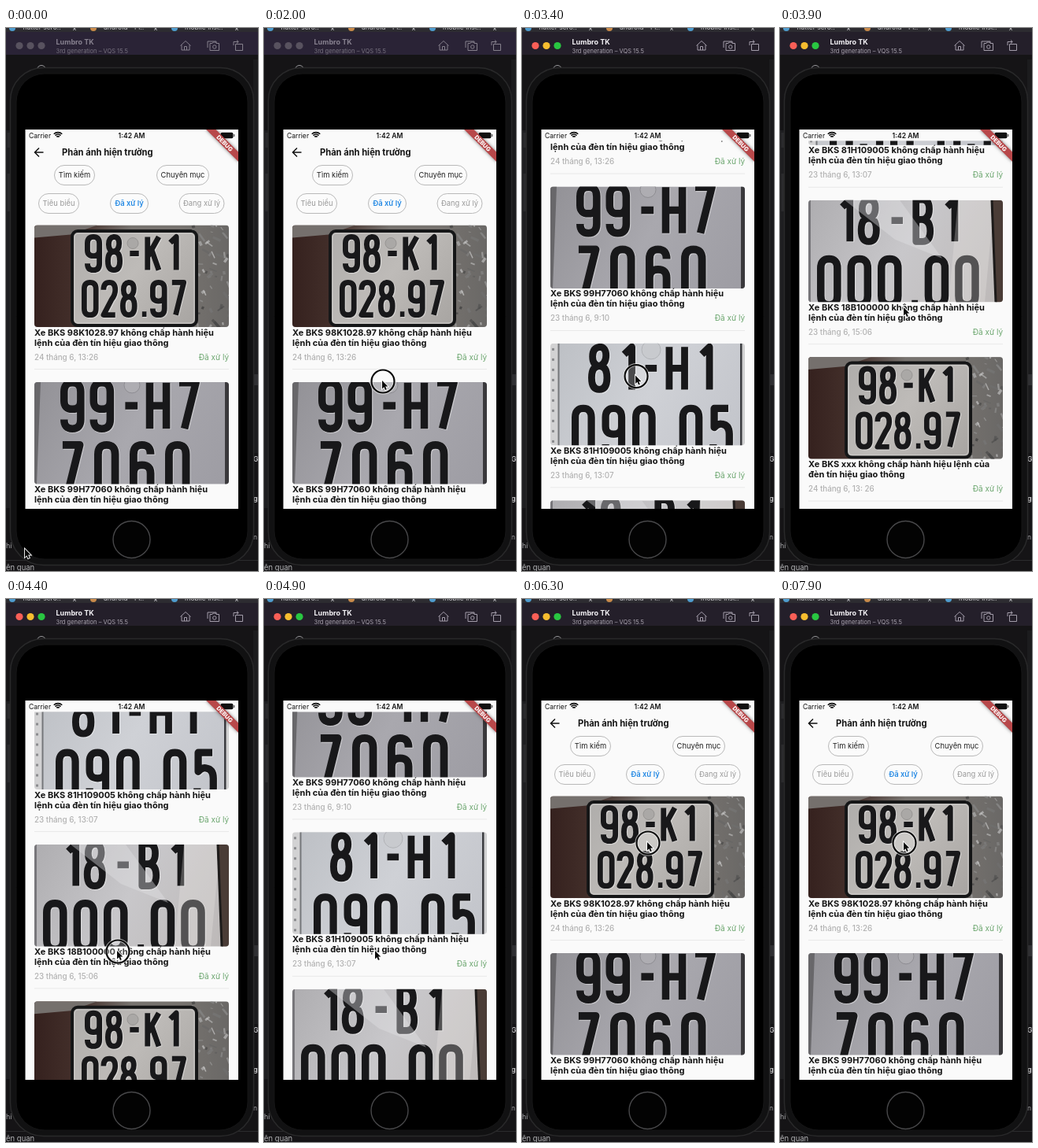
These frames come from a looping animation (320x690 px, 8 s). An HTML page with a canvas:

```html
<!DOCTYPE html>
<html lang="vi">
<head>
<meta charset="utf-8">
<title>Phản ánh hiện trường</title>
<style>
html, body { margin: 0; width: 100%; height: 100%; overflow: hidden; background: #111; }
canvas { display: block; width: 320px; height: 690px; }
</style>
</head>
<body>
<canvas id="stage"></canvas>
<script>
const LOOP = 8000, PITCH = 199.4, FIRST = 250.5;
const DRAG = 200, FLING = 300, HOLD = 100, LEAD = 120, GLIDE = 250;
const cv = document.getElementById('stage'), c = cv.getContext('2d');
const dpr = window.devicePixelRatio || 1;
cv.width = 320 * dpr;
cv.height = 690 * dpr;

// Drags: start time, pointer x, y from, y to, scroll offset where the list settles
const GESTURES = [
  [2100, 150, 448, 300, 248],
  [3400, 144, 442, 355, 630],
  [4200, 157, 355, 447, 353],
  [5300, 158, 310, 440, 0],
  [6400, 159, 309, 380, 0],
  [7200, 157, 309, 170, 139],
  [7620, 157, 170, 309, 0]
];

// Plate lettering as centre lines in a 16 x 40 cell
const GLYPHS = {
  0: 'M0 8Q0 0 8 0T16 8V32Q16 40 8 40T0 32Z',
  1: 'M4 7L12 0V40',
  2: 'M0 9Q0 0 8 0T16 9Q16 15 11 21L0 40H16',
  5: 'M15 0H1V17Q5 13 9 14Q16 15 16 23V31Q16 40 8 40T0 32',
  6: 'M16 8Q16 0 8 0T0 8V32Q0 40 8 40T16 32V24Q16 17 8 17T0 24',
  7: 'M0 0H16L5 40',
  8: 'M8 0Q15 0 15 8T8 18Q1 17 1 9T8 0ZM8 18Q16 18 16 29T8 40Q0 40 0 29T8 18Z',
  9: 'M0 32Q0 40 8 40T16 32V8Q16 0 8 0T0 8V16Q0 23 8 23T16 16',
  K: 'M1 0V40M16 0L1 24M7 17L16 40',
  H: 'M0 0V40M16 0V40M0 20H16',
  B: 'M1 0V40H8Q16 40 16 30T8 19H1M8 19Q15 18 15 9T8 0H1',
  '-': 'M2 20H14',
  '.': 'M0 39H6'
};
const ADVANCE = { 1: .8, '-': .9, '.': .55 };

const TAIL = ' không chấp hành hiệu', LINE2 = 'lệnh của đèn tín hiệu giao thông';
const CARDS = [
  ['Xe BKS 98K1028.97' + TAIL, LINE2, '24 tháng 6, 13:26', photoDark],
  ['Xe BKS 99H77060' + TAIL, LINE2, '23 tháng 6, 9:10', photoGrey],
  ['Xe BKS 81H109005' + TAIL, LINE2, '23 tháng 6, 13:07', photoWhite],
  ['Xe BKS 18B100000' + TAIL, LINE2, '23 tháng 6, 15:06', photoGlare],
  ['Xe BKS xxx' + TAIL + ' lệnh của', 'đèn tín hiệu giao thông', '24 tháng 6, 13: 26', photoDark]
];

const clamp = u => Math.min(1, Math.max(0, u));
const mix = (a, b, u) => a + (b - a) * u;

function scrollAt(t) {
  let s = 0;
  for (const [start, , from, to, end] of GESTURES) {
    if (t < start) break;
    s -= (to - from) * clamp((t - start) / DRAG);
    if (s < 0) s /= 2;
    const u = clamp((t - start - DRAG) / FLING);
    s = mix(s, end, 1 - (1 - u) ** 2);
  }
  return s;
}

function pointerAt(t) {
  let x = 24, y = 662, pressed = false;
  GESTURES.forEach(([start, gx, from, to], i) => {
    const down = start - LEAD, glide = i ? GLIDE : down;
    const u = clamp((t - down + glide) / glide), ease = u * u * (3 - 2 * u);
    x = mix(x, gx, ease);
    y = mix(y, from, ease);
    if (t > start) y = mix(from, to, clamp((t - start) / DRAG));
    // the arrow drifts to its resting spot between drags
    if (t >= down && t < start + DRAG + HOLD) pressed = true;
    if (i === 1 && t > start) x = mix(gx, 157, clamp((t - start) / DRAG));
    if (i === 2 && t > start) x = mix(gx, 141, clamp((t - start) / DRAG));
  });
  return [x, y, pressed];
}

function rect(x, y, w, h, color) {
  c.fillStyle = color;
  c.fillRect(x, y, w, h);
}

function round(x, y, w, h, r, fill, stroke, lw = 1) {
  c.beginPath();
  c.roundRect(x, y, w, h, r);
  if (fill) { c.fillStyle = fill; c.fill(); }
  if (stroke) { c.strokeStyle = stroke; c.lineWidth = lw; c.stroke(); }
}

function disc(x, y, r, fill, stroke, lw) {
  round(x - r, y - r, 2 * r, 2 * r, r, fill, stroke, lw);
}

function text(s, x, y, size, color, weight = 400, align = 'left') {
  c.font = `${weight} ${size}px Inter, "Noto Sans", sans-serif`;
  c.textAlign = align;
  c.fillStyle = color;
  c.fillText(s, x, y);
}

function line(d, color, lw = 1) {
  c.strokeStyle = color;
  c.lineWidth = lw;
  c.stroke(new Path2D(d));
}

function shape(d, color) {
  c.fillStyle = color;
  c.fill(new Path2D(d));
}

function shade(x0, y0, x1, y1, ...colors) {
  const g = c.createLinearGradient(x0, y0, x1, y1);
  colors.forEach((col, i) => g.addColorStop(i / (colors.length - 1), col));
  return g;
}

function random(seed) {
  return () => (seed = seed * 16807 % 2147483647) / 2147483647;
}

// One row of embossed letters; width and weight follow from the height
function row(s, x, y, h, step) {
  const p = new Path2D(), w = h * .45, lw = h * .14;
  for (const ch of s) {
    p.addPath(new Path2D(GLYPHS[ch]),
      new DOMMatrix([(w - lw) / 16, 0, 0, (h - lw) / 40, x + lw / 2, y + lw / 2]));
    x += step * (ADVANCE[ch] || 1);
  }
  c.lineJoin = 'round';
  c.save();
  c.translate(.8, .8);
  c.strokeStyle = 'rgba(255,255,255,.4)';
  c.lineWidth = lw + .8;
  c.stroke(p);
  c.restore();
  c.strokeStyle = '#18181a';
  c.lineWidth = lw;
  c.stroke(p);
}

function photoDark() {
  rect(0, 0, 247, 130, shade(0, 0, 247, 0, '#35211e', '#46322d', '#77736f', '#77736f', '#6a6866'));
  shape('M0 0H80L46 12L0 16Z', '#75706d');
  const rnd = random(11);
  for (let i = 0; i < 60; i++) {
    const x = 200 + 47 * rnd(), y = 130 * rnd(), tone = 50 + 170 * rnd();
    line(`M${x} ${y}l${14 * rnd() - 4} ${16 * rnd() - 6}`, `rgba(${tone},${tone},${tone},.6)`, 1 + 3 * rnd());
  }
  round(48, 7.5, 158, 120, 7, shade(48, 0, 206, 120, '#aeacaa', '#bebbb8', '#a8a5a2'), '#151617', 4);
  round(51, 10.5, 152, 114, 5, null, '#cfcdcb');
  disc(125, 23, 7, '#aaa8a6', '#979593');
  row('98-K1', 64, 11.5, 49, 26);
  row('028.97', 60, 69.5, 48, 24.5);
}

function photoGrey() {
  rect(0, 0, 247, 130, shade(0, 0, 247, 130, '#929196', '#a9a8ae', '#9d9ca3'));
  shape('M0 0H8L3 130H0Z', '#68676a');
  rect(242, 0, 5, 130, '#3a393c');
  disc(124, 4, 10, '#aeadb2', '#8e8d92');
  row('99-H7', 33, -4, 68, 37.5);
  row('7060', 31, 75, 70, 45);
}

function photoWhite() {
  rect(0, 0, 247, 130, '#d2d2d3');
  rect(11, 0, 232, 130, shade(10, 0, 240, 130, '#bdc0c5', '#cfd1d6', '#c2c4ca'));
  rect(9.5, 0, 2, 130, '#74767a');
  rect(241, 0, 2.5, 130, '#3b3c40');
  for (let y = 6; y < 130; y += 13) rect(2, y, 3, 3, '#8a8b8e');
  disc(128, 8, 12, '#c8cace', '#b0b2b6');
  row('81-H1', 48, 0, 63, 36.5);
  row('090.05', 27, 78, 66, 38.5);
}

function photoGlare() {
  rect(0, 0, 247, 130, shade(0, 0, 240, 130, '#aeadb0', '#c8c7ca', '#bdb9b8'));
  rect(0, 0, 3, 130, '#77767a');
  row('18-B1', 34, -5, 62, 36);
  row('000.00', 11, 70, 68, 38.5);
  shape('M46 0H116L170 74L110 50Z', 'rgba(225,225,228,.4)');
  shape('M190 0H236L224 130H178Z', 'rgba(235,232,230,.28)');
  shape('M232 0H247V130H238Z', '#4a3c36');
  line('M233 0L238 130', '#1d1b1a', 3);
}

function card([first, second, date, photo], y) {
  c.save();
  c.translate(36, y);
  c.save();
  c.beginPath();
  c.roundRect(0, 0, 247, 129.5, 4);
  c.clip();
  photo();
  c.restore();
  text(first, 0, 140, 11, '#151515', 700);
  text(second, 0, 153, 11, '#151515', 700);
  text(date, 0, 171, 9.8, '#b2b2b2', 500);
  text('Đã xử lý', 247, 171, 10, '#6aa56d', 400, 'right');
  rect(0, 182.5, 247, 1, '#e9e9e9');
  c.restore();
}

function chip(s, x, y, w, color, weight) {
  round(x + .5, y + .5, w - 1, 25, 12.5, '#fbfbfb', '#b9b9b9');
  text(s, x + w / 2, y + 16.3, 9.4, color, weight, 'center');
}

function app(scroll) {
  c.save();
  c.beginPath();
  c.rect(24.5, 129, 270.5, 482);
  c.clip();
  rect(24, 129, 272, 482, '#fafafa');

  c.save();
  c.beginPath();
  c.rect(24, 143.5, 272, 468);
  c.clip();
  c.save();
  c.translate(0, -Math.max(scroll, 0));
  line('M47.5 158H37M42 152.5L36.5 158L42 163.5', '#111', 1.5);
  text('Phản ánh hiện trường', 71, 162, 11.15, '#151515', 700);
  c.restore();
  c.translate(0, -scroll);
  chip('Tìm kiếm', 61, 174, 52, '#222', 400);
  chip('Chuyên mục', 191, 174, 67, '#222', 400);
  chip('Tiêu biểu', 41, 210, 52, '#999', 400);
  chip('Đã xử lý', 132, 210, 49, '#2389e4', 600);
  chip('Đang xử lý', 219.5, 210, 58, '#999', 400);
  CARDS.forEach((item, i) => card(item, FIRST + PITCH * i));
  c.restore();

  statusBar();
  c.restore();
}

function statusBar() {
  text('Carrier', 29, 139.5, 8.6, '#111');
  text('1:42 AM', 159.5, 139.5, 8.6, '#111', 600, 'center');
  for (let r = 2.4; r < 8; r += 2.5) {
    c.beginPath();
    c.arc(66, 140, r, -Math.PI * .75, -Math.PI * .25);
    c.strokeStyle = '#111';
    c.lineWidth = 1.7;
    c.stroke();
  }
  round(272.5, 132.8, 16, 7.4, 2, '#111');
  rect(289.2, 135, 1.2, 3, '#555');
  c.save();
  c.translate(295, 129);
  c.rotate(Math.PI / 4);
  c.shadowColor = 'rgba(0,0,0,.5)';
  c.shadowBlur = 4 * dpr;
  rect(-28.8, 20.2, 57.6, 8.6, '#b8484a');
  c.shadowBlur = 0;
  text('DEBUG', 0, 27.2, 7.4, '#fff', 800, 'center');
  c.restore();
}

function desktop() {
  rect(0, 0, 320, 690, '#151416');
  rect(0, 0, 320, 6, '#2d2c31');
  ['flutter scro..', 'android - Fl..', 'mobile inst..'].forEach((tab, i) => {
    const x = 8 + 103 * i;
    disc(x, 0, 4, i === 1 ? '#c98a4a' : '#4f9cce');
    text(tab, x + 13, 2, 8.5, '#c8c8cc');
    text('×', x + 76, 4, 9, '#c8c8cc');
  });
  disc(45, 53, 5.5, null, '#99999c');
  rect(0, 130, 5, 480, '#1f1f21');
  rect(314, 40, 6, 500, '#1c1c1e');
  rect(314, 440, 6, 14, '#303033');
  rect(0, 676, 320, 1, '#2b2b2d');
  text('hi', 0, 661, 9, '#a5a5a8');
  text('ên quan', 0, 689, 9.5, '#b5b5b8');
  text('G', 314, 551, 8.5, '#c5c5c8', 600);
  text('g', 314, 601, 9, '#d0d0d2', 600);
  text('n', 314, 650, 8.5, '#a0a0a3');
}

function titleBar(active) {
  rect(0, 5, 320, 29, active ? '#241f2a' : '#2a2336');
  ['#f95f57', '#f6bd2f', '#29c641'].forEach((col, i) =>
    disc(17 + 14 * i, 22.5, 4.6, active ? col : '#58525f'));
  text('Lumbro TK', 63.5, 21, 9, active ? '#f4f2f6' : '#87818f', 700);
  text('3rd generation – VQS 15.5', 63.5, 31.5, 7.5, active ? '#a8a2ae' : '#77717f');
  const ink = active ? '#a39daa' : '#85808c';
  line('M221.5 22.5L228 16.5L234.5 22.5M223 21.5V28H233V21.5M226.5 28V23.5H229.5V28', ink);
  line('M256 25V17H267V19M259 19.5H262L263 18H266L267 19.5H270.5V28.5H259Z', ink);
  disc(264.8, 24, 2.2, null, ink);
  line('M291.5 20.5H300.5V28.5H291.5ZM289 22V17.5H295M293 15.5L295.3 17.5L293 19.5', ink);
}

function phone() {
  rect(1.5, 133, 4, 19, '#2b2b2d');
  rect(1.5, 185, 4, 48, '#2b2b2d');
  round(5.5, 50.5, 309, 632, 42, '#111112', '#29292a', 1.5);
  round(13, 58, 294, 617, 36, '#000', '#161617');
  disc(159.5, 650, 23.5, '#030303', '#48484a', 1.4);
}

function pointer([x, y, pressed]) {
  if (pressed) {
    disc(x + 1, y + 1, 14.5, 'rgba(255,255,255,.22)', 'rgba(255,255,255,.6)', 4);
    disc(x + 1, y + 1, 14.5, null, '#0b0b0b', 2.2);
  }
  c.save();
  c.translate(x, y);
  const arrow = 'M0 0V10.4L2.4 8.2L4 12L5.8 11.2L4.2 7.6H7.4Z';
  line(arrow, '#fff', 1.8);
  shape(arrow, '#0a0a0a');
  c.restore();
}

function draw(t) {
  c.setTransform(dpr, 0, 0, dpr, 0, 0);
  desktop();
  titleBar(t >= GESTURES[0][0]);
  phone();
  app(scrollAt(t));
  pointer(pointerAt(t));
}

const start = performance.now();
function tick() {
  draw((performance.now() - start) % LOOP);
  requestAnimationFrame(tick);
}
tick();
</script>
</body>
</html>
```
